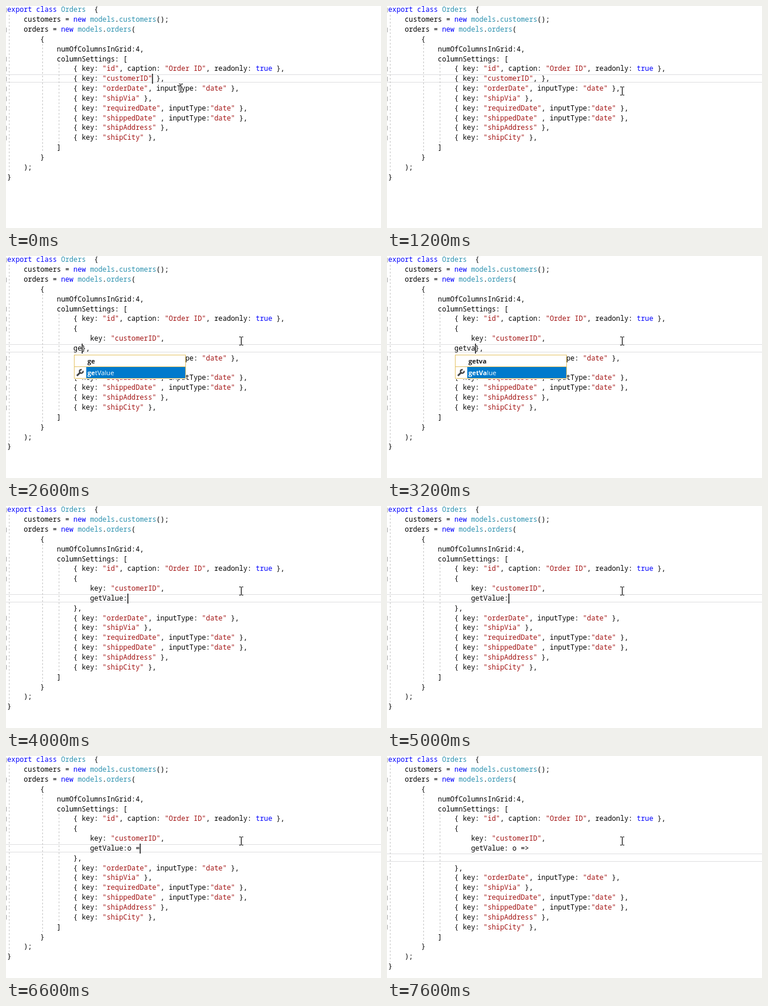
Animation, 640 px wide and 380 px high, one loop 8 s. Source, as an HTML page with a canvas:

```html
<!DOCTYPE html>
<html lang="en">
<head>
<meta charset="utf-8">
<title>Code editor</title>
<style>
html, body { margin: 0; width: 100%; height: 100%; overflow: hidden; background: #fff; }
canvas { display: block; }
</style>
</head>
<body>
<canvas id="stage" width="640" height="380"></canvas>
<script>
const g = document.getElementById('stage').getContext('2d');
const LOOP = 8000, X0 = 2, CELL = 7.07, ROW = 16.84;
const MONO = '11.75px "Noto Sans Mono", "DejaVu Sans Mono", monospace';
const UI = '11.2px "Open Sans", "Noto Sans", sans-serif';
const GOLD = '#e5c365', BLUE = '#007acc', DARK = '#424242', NAVY = '#00539c';

const HEAD = [
  'export class Orders  {',
  '    customers = new models.customers();',
  '    orders = new models.orders(',
  '        {',
  '            numOfColumnsInGrid:4,',
  '            columnSettings: [',
  '                { key: "id", caption: "Order ID", readonly: true },'
];
const TAIL = [
  '                { key: "orderDate", inputType: "date" },',
  '                { key: "shipVia" },',
  '                { key: "requiredDate", inputType:"date" },',
  '                { key: "shippedDate" , inputType:"date" },',
  '                { key: "shipAddress" },',
  '                { key: "shipCity" },',
  '            ]',
  '        }',
  '    );',
  '}'
];

// Each step: start time, edited item ("|" marks the caret), caret shown
const OPEN = '{\n    key: "customerID",\n';
const typed = s => OPEN + s + '|},';
const valued = s => OPEN + '    getValue' + s + '\n},';
const STEPS = [
  [0, '{ key: "customerID"| },', 1],
  [800, '{ key: "customerID",| },', 1],
  [1200, '{ key: "customerID",| },', 0],
  [1400, '{ key: "customerID",\n|},', 1],
  [1600, typed(''), 1],
  [1800, typed(''), 0],
  [2200, typed('g'), 1],
  [2400, typed('ge'), 1],
  [2800, typed('get'), 1],
  [3000, typed('getv'), 1],
  [3200, typed('getva'), 1],
  [3400, valued('|'), 1],
  [4000, valued(':|'), 1],
  [4400, valued(':|'), 0],
  [5000, valued(':|'), 1],
  [5800, valued(':o|'), 1],
  [6400, valued(':o |'), 1],
  [6600, valued(':o =|'), 1],
  [6800, valued(':o =>|'), 1],
  [7000, valued(': o =>\n        |'), 1],
  [7600, valued(': o =>\n        |'), 0]
];
const POINTER = [[0, 298, 140], [200, 326, 148], [400, 370, 151], [600, 401, 145]];

const at = (list, t) => list.filter(s => s[0] <= t).pop();
const colX = c => X0 + c * CELL;
const rowTop = r => Math.round(r * ROW - 2);

function box(x, y, w, h, color) {
  g.fillStyle = color;
  g.fillRect(x, y, w, h);
}

function frame(x, y, w, h, color) {
  g.strokeStyle = color;
  g.lineWidth = 1;
  g.strokeRect(x + .5, y + .5, w - 1, h - 1);
}

function path(points, color, width = 1, fill) {
  g.beginPath();
  points.forEach(([x, y]) => g.lineTo(x, y));
  g.lineWidth = width;
  g.strokeStyle = g.fillStyle = color;
  fill ? g.fill() : g.stroke();
}

function disc(x, y, r, color, fill) {
  g.beginPath();
  g.arc(x, y, r, 0, 7);
  g.lineWidth = 1.5;
  g.strokeStyle = g.fillStyle = color;
  fill ? g.fill() : g.stroke();
}

function codeLine(text, row) {
  const y = Math.round(10.4 + row * ROW);
  const token = /("[^"]*")|\b(export|class|new|true)\b|(\bOrders\b|\bmodels\b|\w+(?=\())|\w+|\S/g;
  g.font = MONO;
  for (const m of text.matchAll(token)) {
    g.fillStyle = m[1] ? '#a31515' : m[2] ? '#0000ff' : m[3] ? '#2b91af' : '#000';
    [...m[0]].forEach((ch, i) => g.fillText(ch, colX(m.index + i), y));
  }
}

function guide(col, from, to) {
  const x = Math.floor(colX(col + .5)) + .5;
  g.setLineDash([3, 3]);
  path([[x, rowTop(from)], [x, rowTop(to)]], '#c4c4c4');
  g.setLineDash([]);
}

function label(text, bold, x, y, color) {
  g.fillStyle = color;
  g.font = 'bold ' + UI;
  const head = text.slice(0, bold);
  g.fillText(head, x, y + 4);
  const w = bold ? g.measureText(head).width : 0;
  g.font = UI;
  g.fillText(text.slice(bold), x + w, y + 4);
}

function keywordIcon(x, y) {
  [[-6, -5, 6], [2, -5, 4], [-6, -2, 9], [-6, 1, 4], [0, 1, 6], [-6, 4, 8], [4, 4, 2]]
    .forEach(([dx, dy, w]) => box(x + dx, y + dy, w, 1, DARK));
}

function typeIcon(x, y) {
  disc(x - 5, y, 2, NAVY, true);
  path([[x - 5, y], [x + 1, y]], NAVY, 1.3);
  disc(x + 4, y, 2.8, NAVY);
}

function wrench(x, y) {
  path([[x - 5, y + 5], [x + 1, y - 1]], DARK, 3);
  g.beginPath();
  g.arc(x + 2.5, y - 2.5, 3, -.3, 5);
  g.lineWidth = 2.2;
  g.stroke();
}

function shortList(word) {
  box(116, 169, 191, 42, '#fff');
  box(137, 190, 169, 19, BLUE);
  frame(116, 169, 191, 41, GOLD);
  frame(116, 169, 191, 21, GOLD);
  label(word, word.length, 139, 180, '#1e1e1e');
  wrench(126, 200);
  label('getValue', word.length, 139, 200, '#fff');
}

function filterIcons(y) {
  path([[219, y - 4], [217, y - 4], [217, y + 4], [219, y + 4]], DARK);
  path([[227, y - 4], [229, y - 4], [229, y + 4], [227, y + 4]], DARK);
  disc(223, y, 2.4, DARK, true);
  frame(244, y - 5, 10, 10, DARK);
  box(247, y - 2, 4, 1, DARK);
  box(247, y + 1, 4, 1, DARK);
  path([[276, y - 5], [280, y - 2], [280, y + 3], [276, y + 5], [272, y + 3], [272, y - 2],
    [276, y - 5]], '#652d90', 1.2);
  path([[272, y - 2], [276, y], [280, y - 2]], '#652d90');
  path([[276, y], [276, y + 5]], '#652d90');
  typeIcon(307, y);
  const orange = '#c27d1a';
  path([[329, y - 2], [333, y - 6], [336, y - 3], [332, y + 1]], orange, 1, true);
  path([[333, y - 1], [339, y - 1]], orange, 1.3);
  path([[335, y - 1], [335, y + 4], [338, y + 4]], orange, 1.3);
  [[340, y - 1], [339, y + 4]].forEach(p => disc(...p, 2, orange, true));
  g.font = 'bold ' + UI;
  g.fillStyle = DARK;
  g.fillText('{ }', 357, y + 4);
  keywordIcon(391, y);
}

function longList() {
  box(208, 169, 270, 203, '#fff');
  box(460, 170, 17, 172, '#e8e8ec');
  box(463, 247, 10, 8, '#c2c3c9');
  path([[464, 181], [468.5, 176], [473, 181]], '#868999', 1, true);
  path([[464, 331], [468.5, 336], [473, 331]], '#868999', 1, true);
  ['null', 'Number', 'number', 'Object', 'object', 'OES_element_index_uint',
    'OES_standard_derivatives', 'OES_texture_float', 'OES_texture_float_linear'
  ].forEach((word, i) => {
    const y = 180 + i * 19, picked = word === 'object';
    if (picked) box(229, y - 9, 231, 19, BLUE);
    (/^[A-Z]/.test(word) ? typeIcon : keywordIcon)(218, y);
    label(word, /^o/i.test(word) ? 1 : 0, 231, y, picked ? '#fff' : '#1e1e1e');
  });
  box(209, 342, 268, 1, GOLD);
  filterIcons(357);
  frame(208, 169, 270, 203, GOLD);
}

function pointer(x, y) {
  x += .5;
  path([[x, y - 6], [x, y + 7]], '#000', 1.2);
  for (const s of [-1, 1])
    for (const v of [-6.5, 7.5]) path([[x + s * 3.5, y + v], [x + s * .5, y + v]], '#000');
}

function draw(now) {
  const t = now % LOOP;
  const [, item, caretOn] = at(STEPS, t);
  const edited = item.split('\n');
  const current = edited.findIndex(s => s.includes('|'));
  const caretRow = HEAD.length + current;
  const caretCol = 16 + edited[current].indexOf('|');
  const lines = [...HEAD, ...edited.map(s => ' '.repeat(16) + s.replace('|', '')), ...TAIL];
  const last = lines.length - 1;

  box(0, 0, 640, 380, '#fff');
  const top = rowTop(caretRow);
  box(0, top + 1, 640, 1, '#dedee0');
  box(0, top + 14, 640, 1, '#dedee0');
  guide(0, 1, last);
  guide(8, 4, last - 2);
  guide(12, 6, last - 3);
  lines.forEach((s, i) => {
    if (/^export|orders =|\[$|^ {16}\{/.test(s)) box(0, rowTop(i) + 5, 1, 8, '#a5a5a5');
    codeLine(s, i);
  });
  if (caretOn) box(Math.round(colX(caretCol)) + .3, top, 1.4, 17, '#000');

  if (t >= 2600 && t < 3400) shortList(item.match(/get?v?a?(?=\|)/)[0]);
  if (t >= 5800 && t < 6000) longList();
  const [, px, py] = at(POINTER, t);
  pointer(px, py);
}

const start = performance.now();
function tick() {
  draw(performance.now() - start);
  requestAnimationFrame(tick);
}
tick();
</script>
</body>
</html>
```
